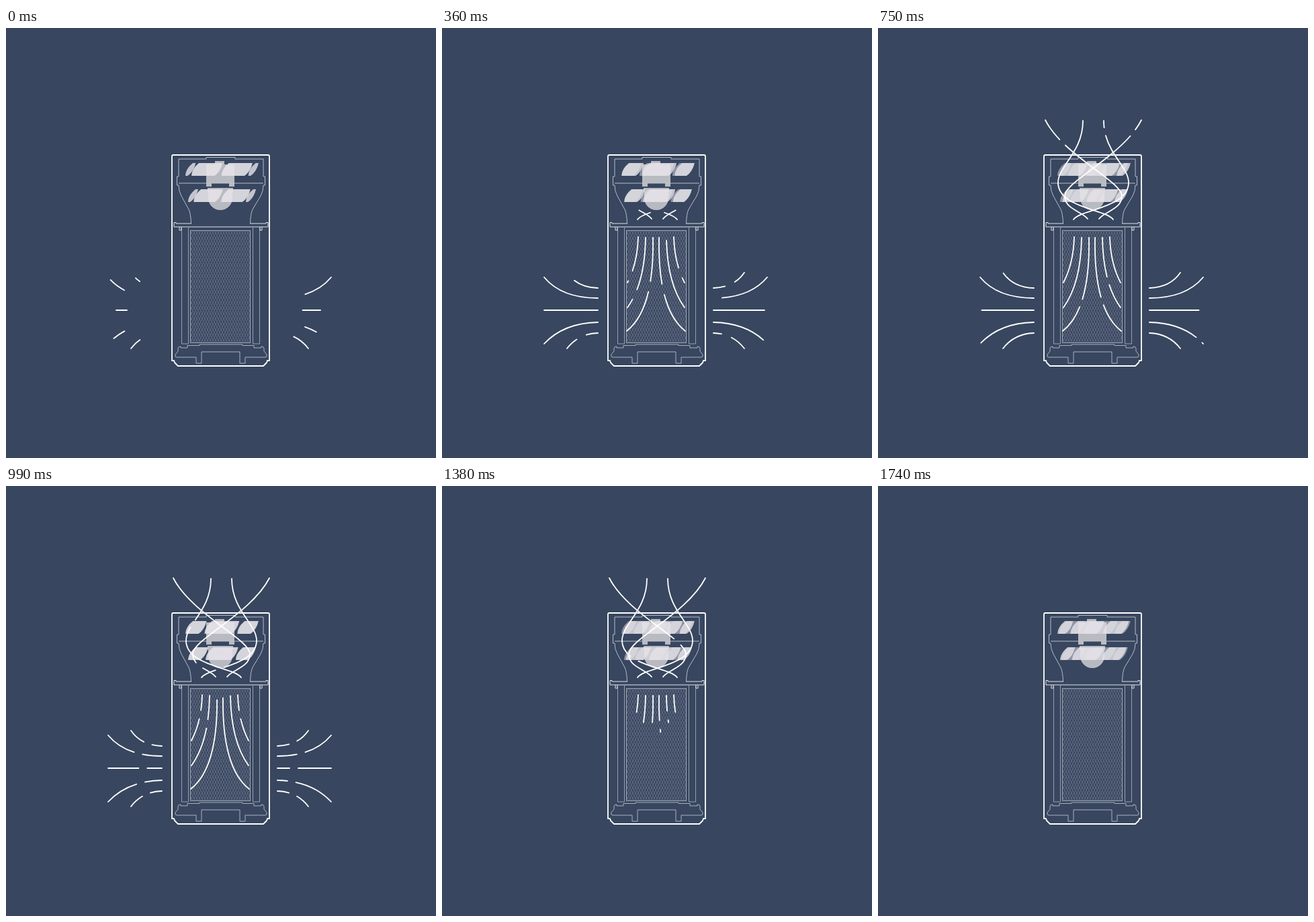
Write an HTML page that moves like this. It is 640 by 640 pixels and loops after 1.77 s.

```html
<!DOCTYPE html>
<html lang="en">
<head>
<meta charset="utf-8">
<title>Air flow</title>
<style>
html, body { margin: 0; width: 100%; height: 100%; overflow: hidden; background: #38465f; }
svg { display: block; width: 100vw; height: 100vh; fill: none; }
.thin { stroke: #b4bcc9; stroke-width: 1; }
.case { stroke: #fff; stroke-width: 1.8; stroke-linejoin: round; }
#flow { stroke: #fff; stroke-width: 1.8; stroke-linecap: round; }
</style>
</head>
<body>
<svg viewBox="0 0 640 640">
  <defs>
    <pattern id="mesh" x="274" y="301" width="4" height="8" patternUnits="userSpaceOnUse">
      <path d="M0 0L4 8M4 0L0 8" stroke="#b9c2cf" stroke-width=".55" opacity=".5"/>
    </pattern>
  </defs>
  <rect x="274.5" y="301.5" width="89" height="167" fill="url(#mesh)" class="thin" stroke-opacity=".8"/>
  <g class="thin">
    <path d="M261.5 297V470H271.5V297M367.5 297V470H377.5V297" opacity=".75"/>
    <path d="M257 221V195H298V192.500H341V195H383V221M257 221H254.500V234H257M383 221H385.500V234H383M257 231H383"/>
    <path d="M257 234Q257 243 261 250L272 270Q275 276 275.500 291M383 234Q383 243 379 250L367 270Q364 276 363.500 291"/>
    <path d="M276 291H253V289.500H250V296H390V289.500H387V291H363M258 296V301H261V296M378 296V301H381V296" stroke="#dfe3e9"/>
    <path d="M283 490H254Q251 490 252 486L256 481V477Q256 474 260 474V476H270V472.500H288V471H352V472.500H369V476H380V474Q384 474 384 477V481L388 486Q389 490 386 490H356V499H348V482H291V499H283Z" opacity=".9"/>
  </g>
  <path class="case" d="M247 495V191Q247 189 249 189H390Q392 189 392 191V495H389L388 498L383 503H256L251 498L250 495Z"/>
  <g fill="#c4c5cb" opacity=".92">
    <path d="M298 236V203H311V198H325V203H340V236H332V231H306V236Z"/>
    <path d="M300 238H338V244H337V253A18 18 0 0 1 301 253V244H300Z"/>
  </g>
  <g id="fan"></g>
  <g id="flow"></g>
</svg>
<script>
const LOOP = 1770, FRAME = 30, PERIOD = 1.35;
const KEYS = [0, 210, 510, 750, 1230, LOOP];
const GAPS = [40, 18, 14, 12, 14, 14]; // gap width in pixels at each key
const clamp = v => Math.max(0, Math.min(1, v));

function add(parent, attrs) {
  const el = document.createElementNS('http://www.w3.org/2000/svg', 'path');
  for (const k in attrs) el.setAttribute(k, attrs[k]);
  return document.getElementById(parent).appendChild(el);
}

function lerpKeys(values, t) {
  let i = 0;
  while (i < KEYS.length - 2 && t >= KEYS[i + 1]) i++;
  return values[i] + (values[i + 1] - values[i]) * (t - KEYS[i]) / (KEYS[i + 1] - KEYS[i]);
}

// Each gap travels forward only, wrapping once per PERIOD.
function unwrap(stops) {
  const out = [stops[0]];
  for (const s of stops.slice(1)) {
    const least = out[out.length - 1] + .3;
    out.push(s + PERIOD * Math.max(0, Math.ceil((least - s) / PERIOD)));
  }
  out.push(out[out.length - 1] + PERIOD);
  return out;
}

const mirror = (d, sum) => d.replace(/(\d+) (\d+)/g, (m, x, y) => `${sum - x} ${y}`);

const streams = [];
// start and grow time the drawing head, erase is when the tail sets off
function stream(d, start, grow, erase, stops) {
  const el = add('flow', { d, pathLength: 1 });
  streams.push({ el, len: el.getTotalLength(), start, grow, erase, gap: unwrap(stops) });
}

const still = [0, 0, 0, 0, 0];
[
  ['M186 364Q201 386 232 387', [.2, 1, .95, .02, .08], [.55, 0, 0, 0, 0]],
  ['M152 371Q178 402 232 402', [.06, .55, .54, 0, 0], [0, .37, .36, 0, 0]],
  ['M152 420L232 420', [.15, .69, .64, .03, .08], [.2, .74, .71, .08, .12]],
  ['M152 470Q181 439 232 438', [.13, .63, .62, .02, .06], [.32, .76, .77, .16, .16]],
  ['M186 477Q203 455 232 454', still, [0, .2, 0, 0, 0]]
].forEach(([d, left, right]) => {
  stream(d, -60, 171, 1235, left);
  stream(mirror(d, 636), -60, 113, 1235, right);
});
[
  ['M276 379Q291 350 292 311', 167, [0, 0, .54, 0, 0], 133, [0, 0, .68, 0, 0]],
  ['M276 416Q302 380 303 312', 222, [0, 0, .56, 0, 0], 100, [0, .37, .5, .46, .42]],
  ['M275 451Q316 419 314 312', 125, [0, .3, .83, .38, .36], 130, [0, .25, .82, .4, .38]]
].forEach(([d, growLeft, left, growRight, right]) => {
  stream(d, 110, growLeft, 1310, left);
  stream(mirror(d, 637), 110, growRight, 1310, right);
});
[
  ['M350 285C340 270 268 268 268 230C268 205 305 185 305 138', still, [0, 0, 0, .95, .76]],
  ['M312 284C304 273 278 270 278 250C278 228 365 190 392 137', [0, 0, 0, .92, .77], [0, 0, 0, .83, 0]]
].forEach(([d, a, b]) => {
  stream(d, 330, 280, 1390, a);
  stream(mirror(d, 641), 330, 280, 1390, b);
});

function drawStream(s, t) {
  const head = clamp((t - s.start) / s.grow);
  const tail = clamp((t - s.erase) / 110);
  const end = lerpKeys(s.gap, t) % PERIOD;
  const begin = end - lerpKeys(GAPS, t) / s.len;
  const parts = [[tail, Math.min(head, begin)], [Math.max(tail, end), head]]
    .filter(([a, b]) => b - a > .02);
  s.el.style.display = parts.length ? '' : 'none';
  if (!parts.length) return;
  const dashes = parts.flatMap(([a, b], i) => [b - a, parts[i + 1] ? parts[i + 1][0] - b : 9]);
  s.el.setAttribute('stroke-dasharray', dashes.join(' '));
  s.el.setAttribute('stroke-dashoffset', -parts[0][0]);
}

const BLADES = 6, STEP = 2 * Math.PI / BLADES, CHORD = .85;
const blades = [];
for (const [y, r] of [[201, 49], [240, 45]])
  for (let i = 0; i < BLADES; i++)
    blades.push({ el: add('fan', { fill: '#e6e4e9' }), y, r, i });

function drawBlade({ el, y, r, i }, t) {
  const a = Math.PI - CHORD / 2 + STEP * (i + 17 * t / LOOP);
  const edges = [0, .25, .5, .75, 1].map(k => 320 + r * Math.cos(a + CHORD * k));
  const lo = Math.min(...edges), hi = Math.max(...edges);
  el.setAttribute('d', `M${lo + 7} ${y}Q${lo - 4} ${y + 9} ${lo - 4} ${y + 19}` +
    `H${hi - 5}Q${hi + 4} ${y + 13} ${hi + 7} ${y}Z`);
  el.setAttribute('opacity', Math.sin(a + CHORD / 2) > -.1 ? .8 : .5);
}

function draw() {
  const t = Math.floor(performance.now() % LOOP / FRAME) * FRAME;
  streams.forEach(s => drawStream(s, t));
  blades.forEach(b => drawBlade(b, t));
  requestAnimationFrame(draw);
}
draw();
</script>
</body>
</html>
```
